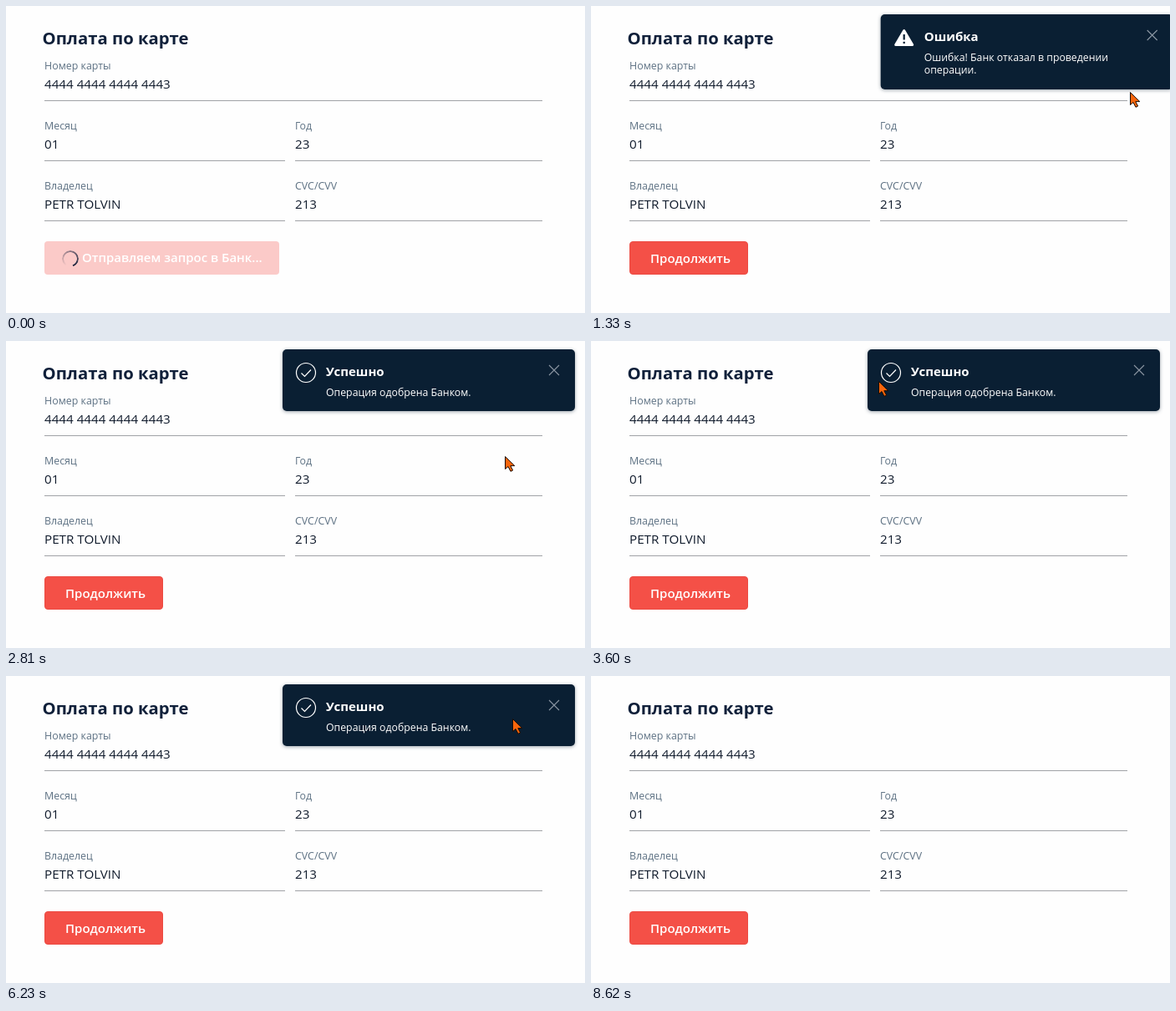
Recreate the animation shown at these times as an HTML page. Size 693 by 368 pixels, loop 9.14 s.

```html
<!DOCTYPE html>
<html lang="ru">
<head>
<meta charset="utf-8">
<title>Оплата по карте</title>
<style>
html, body { margin: 0; width: 100%; height: 100%; overflow: hidden; background: #fefefe; }
svg { position: absolute; left: 0; top: 0; }
text { font-family: "Open Sans", "Noto Sans", sans-serif; white-space: pre; }
.title { font-size: 20.3px; font-weight: 700; fill: #10203a; }
.label { font-size: 12.4px; fill: #5d7183; }
.value { font-size: 15.2px; fill: #101b2c; }
.rule { stroke: #a0a2a6; }
.button { font-size: 15px; font-weight: 600; fill: #fff; }
.head { font-size: 15px; font-weight: 700; fill: #fff; }
.body { font-size: 12.3px; font-weight: 500; fill: #fff; }
.toast { filter: drop-shadow(0 1px 2px rgba(10, 31, 51, .4)); }
.close { stroke-width: 1.1; }
.pointer { fill: #f8650c; stroke: #1c0d04; stroke-linejoin: round; }
#spinner {
  position: absolute; left: 67px; top: 293px; width: 20px; height: 20px; border-radius: 50%;
  background: conic-gradient(from 190deg, transparent 20deg, #17203a 325deg, transparent 333deg);
  -webkit-mask: radial-gradient(circle, transparent 7.5px, #000 8.2px);
  mask: radial-gradient(circle, transparent 7.5px, #000 8.2px);
}
</style>
</head>
<body>
<svg id="stage" width="693" height="368" viewBox="0 0 693 368"></svg>
<div id="spinner"></div>
<script>
const LOOP = 9140, SENT = 940, EXIT = 8620;
const stage = document.getElementById("stage");
const $ = id => document.getElementById(id);

const text = (cls, x, y, s) => `<text class="${cls}" x="${x}" y="${y}">${s}</text>`;
const field = (x, right, row, label, value) => {
  const y = 76 + row * 72;
  return text("label", x, y, label) + text("value", x, y + 23, value) +
    `<path class="rule" d="M${x} ${y + 37.5}H${right}"/>`;
};
const toast = (id, h, icon, head, lines) =>
  `<g id="${id}" class="toast"><rect x="331" y="10" width="350" height="${h}" rx="5" fill="#0a1f33"/>` +
  icon + text("head", 383, 42, head) +
  lines.map((s, i) => text("body", 383, 66 + i * 15, s)).join("") +
  `<path class="close" d="M650 29l12 12M662 29l-12 12"/></g>`;

const check = `<g fill="none" stroke="#fff" stroke-width="1.2"><circle cx="359" cy="38" r="11.5"/>
  <path d="M353.5 38.5l4 4 7.5-8"/></g>`;
const warning = `<path d="M359 29.5L369 46.5H349Z" fill="#fff" stroke="#fff" stroke-width="3" stroke-linejoin="round"/>
  <path d="M359 34v6.5M359 42.7v2.3" stroke="#0a1f33" stroke-width="2.2"/>`;

stage.innerHTML =
  text("title", 43.5, 46, "Оплата по карте") +
  field(46, 642, 0, "Номер карты", "4444 4444 4444 4443") +
  field(46, 334, 1, "Месяц", "01") +
  field(346, 642, 1, "Год", "23") +
  field(46, 334, 2, "Владелец", "PETR TOLVIN") +
  field(346, 642, 2, "CVC/CVV", "213") +
  `<g id="busy"><rect x="46" y="282" width="281" height="40" rx="4" fill="#fbcac8"/>` +
  text("button", 91, 307, "Отправляем запрос в Банк...") + `</g>` +
  `<g id="ready"><rect x="46.5" y="282.5" width="141" height="39" rx="3.5" fill="#f45047" stroke="#ec4a42"/>` +
  text("button", 71, 308, "Продолжить") + `</g>` +
  toast("error", 90, warning, "Ошибка", ["Ошибка! Банк отказал в проведении", "операции."]) +
  toast("success", 74, check, "Успешно", ["Операция одобрена Банком."]) +
  `<g id="cursor"><path id="arrow" class="pointer" d="M.5 .5V15.5L4 12.5L7 18.3L9.6 17L6.8 11.6H11.8Z"/>
  <path id="hand" class="pointer" transform="translate(-5)"
    d="M4.5 13V2Q6 -1 7.5 2V7Q9 6 10.3 7.4Q11.8 6.6 12.9 8.2Q15.5 8 15.5 10.5V14.5L14 18.5V21.5H6V19.5L1 13.5Q0 9 4.5 13ZM7.5 7v4.5M10.3 7.4v4M12.9 8.2v4"/></g>`;

// Pointer moves; bow bends the path downwards
const moves = [
  { from: SENT, to: 1330, x: 645, y: 103 },
  { from: 1560, to: 1800, x: 617, y: 75 },
  { from: 1800, to: 2190, x: 655, y: 28 },
  { from: 2430, to: 2810, x: 597, y: 138, bow: 80 },
  { from: 2810, to: 3560, x: 323, y: 55 },
  { from: 3560, to: 4240, x: 664, y: 40, bow: -35 },
  { from: 4270, to: 4390, x: 672, y: 42 },
  { from: 4390, to: 4800, x: 660, y: 34 },
  { from: 5910, to: 6230, x: 606, y: 51 },
  { from: 6510, to: 6590, x: 604, y: 82 },
  { from: 6740, to: 7100, x: 371, y: 30 },
  { from: 7250, to: 8120, x: 552, y: 65, bow: 25 },
  { from: 8360, to: EXIT, x: 660, y: 368 }
];

const ramp = (t, from, to) => Math.min(1, Math.max(0, (t - from) / (to - from)));
const show = (id, on) => $(id).style.display = on ? "" : "none";
const fade = (id, a) => { show(id, a > 0); $(id).style.opacity = a; };

function pointAt(t) {
  let x = 680, y = 340;
  for (const m of moves) {
    const k = ramp(t, m.from, m.to);
    x += (m.x - x) * k;
    y += (m.y - y) * k + (m.bow || 0) * Math.sin(Math.PI * k);
  }
  return [Math.round(x), Math.round(y)];
}

function draw(now) {
  const t = now % LOOP, waiting = t < SENT;
  show("busy", waiting);
  show("spinner", waiting);
  show("ready", !waiting);
  $("spinner").style.transform = `rotate(${t * .36}deg)`;

  const slide = 362 * (1 - ramp(t, 1044, 1344));
  $("error").setAttribute("transform", `translate(${slide.toFixed(1)})`);
  fade("error", t < 1044 ? 0 : 1 - ramp(t, 2430, 2630));
  fade("success", ramp(t, 2540, 2740) - ramp(t, 7820, 8120));

  const [x, y] = pointAt(t), onClose = x > 645 && y < 52;
  stage.querySelectorAll(".close").forEach(c => c.setAttribute("stroke", onClose ? "#fff" : "#8b96a2"));
  show("cursor", !waiting && t < EXIT);
  show("arrow", !onClose);
  show("hand", onClose);
  $("cursor").setAttribute("transform", `translate(${x} ${y})`);
}

const start = performance.now();
function tick() {
  draw(performance.now() - start);
  requestAnimationFrame(tick);
}
tick();
</script>
</body>
</html>
```
